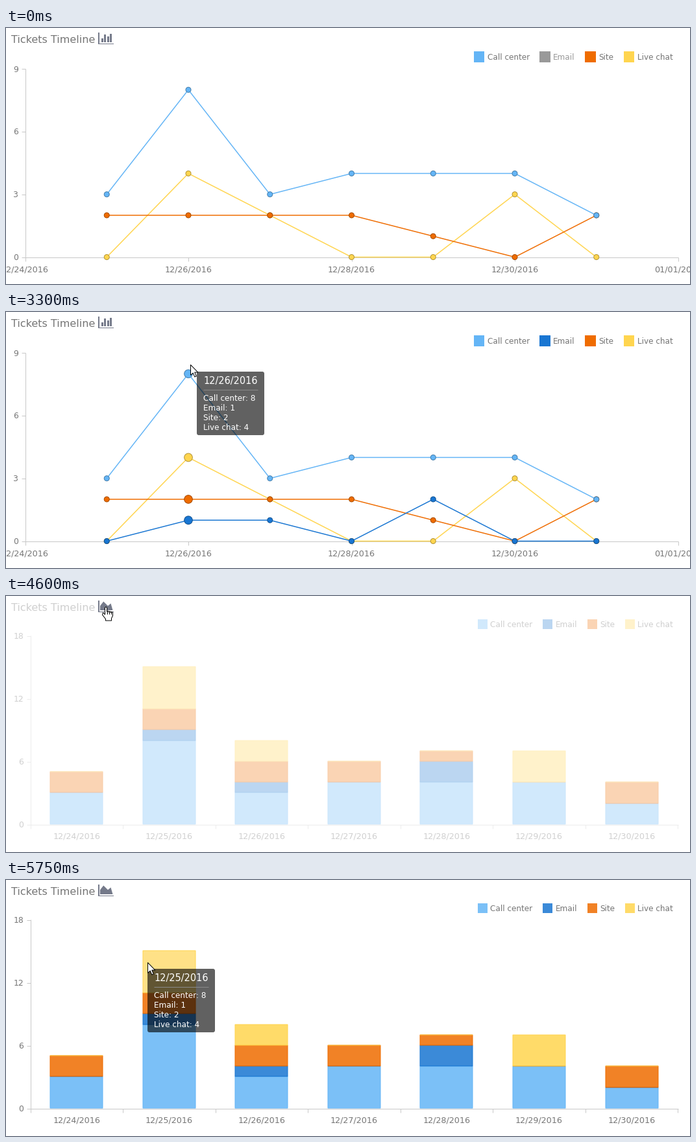
These frames come from a looping animation (1054 by 395 pixels, 6500 ms). A matplotlib script:

```python
import math

import matplotlib.pyplot as plt
from matplotlib.animation import FuncAnimation
from matplotlib.colors import to_rgb, to_rgba
from matplotlib.patches import Circle, FancyBboxPatch, Polygon, Rectangle

W, H, DPI = 1054, 395, 64
STEP, LOOP = 50, 6500
PT = 72 / DPI  # points per pixel

GRAY, AXIS, OFF = "#767676", "#c8c8c8", "#999999"
ICON, ICON_HOT = (0.46, 0.48, 0.54), (0.30, 0.72, 0.84)
EMAIL, EMAIL_SOFT = "#1976d2", "#6496e6"
FILL = 0.85  # opacity of bars and their legend

NAMES = ["Call center", "Email", "Site", "Live chat"]
COLORS = ["#64b5f6", EMAIL, "#ef6c00", "#ffd54f"]
DATA = [
    [3, 8, 3, 4, 4, 4, 2],
    [0, 1, 1, 0, 2, 0, 0],
    [2, 2, 2, 2, 1, 0, 2],
    [0, 4, 2, 0, 0, 3, 0],
]

plt.rcParams["font.family"] = "DejaVu Sans"
fig = plt.figure(figsize=(W / DPI, H / DPI), dpi=DPI, facecolor="white")
ax = fig.add_axes([0, 0, 1, 1])
ax.set_xlim(0, W)
ax.set_ylim(H, 0)
ax.axis("off")


def text(x, y, s, px=12, color=GRAY, ha="left", z=2):
    return ax.text(x, y, s, fontsize=px * PT, color=color, ha=ha,
                   va="baseline", zorder=z)


def line(xs, ys, color=AXIS, px=1.0, z=1):
    return ax.plot(xs, ys, color=color, lw=px * PT, zorder=z,
                   solid_capstyle="butt")[0]


def patch(p):
    return ax.add_patch(p)


def box(x, y, w, h, **kw):
    return patch(Rectangle((x, y), w, h, **kw))


def show(artists, on):
    for a in artists:
        a.set_visible(on)


def mix(a, b, k):
    return tuple(p + (q - p) * k for p, q in zip(a, b))


def darker(color):
    return mix(to_rgb(color), (0, 0, 0), 0.3)


def ramp(t, start, end):
    return min(1.0, max(0.0, (t - start) / (end - start)))


def smooth(k):
    return k * k * (3 - 2 * k)


def date(day):
    return f"12/{24 + day}/2016" if day < 8 else "01/01/2017"


def legend(x, size, base, alpha):
    squares, words = [], []
    for name, color in zip(NAMES, COLORS):
        squares.append(box(x, 36, size, size, fc=to_rgba(color, alpha),
                           ec="none", zorder=2))
        words.append(text(x + size + 4.5, base, name))
        x += size + 20 + words[-1].get_window_extent().width
    return squares, words


def axes_frame(x0, y0, top, ticks_x, ticks_y, labels_y, right):
    parts = [line([x0, x0], [top, y0]), line([x0, 1035.5], [y0, y0], z=6)]
    parts += [line([x, x], [y0, y0 + 6]) for x in ticks_x]
    for y, s in zip(ticks_y, labels_y):
        parts.append(line([x0 - 6, x0], [y, y]))
        parts.append(text(right, y + 4.5, s, 12.4, ha="right"))
    return parts


# Line chart
def line_x(day):
    return 29.5 + 125.75 * day


def line_y(v):
    return 353.5 - 32.27 * v


days, levels = range(0, 9, 2), range(0, 10, 3)
line_chart = axes_frame(29.5, 353.5, 63, map(line_x, days),
                        map(line_y, levels), levels, 19)
line_chart[1].set_zorder(1)
line_chart += [text(line_x(d), 376, date(d), 12.7, ha="center") for d in days]

xs = [line_x(d) for d in range(1, 8)]
series, peak_dots = {}, []
for i in reversed(range(4)):
    z = 5 - i * 0.5
    ys = [line_y(v) for v in DATA[i]]
    dots = [patch(Circle(p, 4, fc=COLORS[i], ec=darker(COLORS[i]), lw=PT,
                         zorder=z + 0.1)) for p in zip(xs, ys)]
    peak_dots.append(dots[1])
    series[i] = [line(xs, ys, COLORS[i], 1.5, z)] + dots
    line_chart += series[i]
email = series[1]

squares, words = legend(720.5, 16.5, 49, 1)
line_chart += squares + words
email_mark, email_word = squares[1], words[1]


# Stacked bar chart
def bar_x(k):
    return 37.5 + 142.54 * k


def bar_y(v):
    return round(352 - 16.17 * v)


levels = range(0, 19, 6)
bar_chart = axes_frame(37.5, 352.5, 61, map(bar_x, range(8)),
                       [bar_y(v) + 0.5 for v in levels], levels, 27.5)
bars = {}
for k in range(7):
    mid = bar_x(k + 0.5)
    bar_chart.append(text(mid, 375, date(k), 12.7, ha="center"))
    total = 0
    for i, color in enumerate(COLORS):
        low, total = bar_y(total), total + DATA[i][k]
        bars[k, i] = box(round(mid - 40.5), low, 81, bar_y(total) - low,
                         fc=to_rgba(color, FILL), ec=color, lw=PT,
                         snap=False, zorder=2 + i * 0.1)
bar_chart += bars.values()
hot_bar = bars[1, 3]
squares, words = legend(727, 15, 48, FILL)
bar_chart += squares + words

# Title, fade veil and switch icon
text(8, 23, "Tickets Timeline", 16)
veil = box(0, 0, W, H, fc="white", ec="none", zorder=8)

U = 1.5
frame_icon = [box(142, 7, U, 18, ec="none", zorder=9),
              box(142, 25 - U, 24, U, ec="none", zorder=9)]
bars_icon = [box(142 + 3 * U * (j + 1), 22 - h * U, 2 * U, h * U, ec="none",
                 zorder=9) for j, h in enumerate((4, 8, 6, 9))]
area_icon = [patch(Polygon([(142 + x * U, 7 + y * U) for x, y in
                            [(13, 3), (15, 10), (2, 10), (2, 5.5),
                             (5.5, 1), (10, 5.5)]], ec="none", zorder=9))]
icon = frame_icon + bars_icon + area_icon


def tooltip(x, y, title):
    parts = [patch(FancyBboxPatch((x, y), 104, 98, fc="black", ec="none",
                                  boxstyle="round,pad=0,rounding_size=3",
                                  zorder=10)),
             text(x + 10, y + 19, title, 14.5, "white", z=11),
             line([x + 10, x + 94], [y + 27.5, y + 27.5], "#8a8a8a", z=11)]
    for j, (name, row) in enumerate(zip(NAMES, DATA)):
        parts.append(text(x + 10, y + 45 + 15 * j, f"{name}: {row[1]}", 12,
                          "white", z=11))
    return parts


def fade_tip(tip, k):
    show(tip, k > 0)
    tip[0].set_alpha(0.62 * k)
    for a in tip[1:]:
        a.set_alpha(k)


line_tip = tooltip(294, 92, date(2))
bar_tip = tooltip(218, 137, date(1))

# Mouse pointers, drawn around their tip
ARROW = [(0, 0), (0, 16), (3.7, 12.6), (6.3, 18.6), (8.8, 17.5),
         (6.3, 11.6), (11.3, 11.6)]
FINGERS = [(3 * j - 1, 0.5 + 5.5 * (j > 0) + j * 0.7) for j in range(4)]
HAND = [(x + dx, y + (dx in (0, 3))) for x, y in FINGERS for dx in range(4)]
HAND += [(11, 14), (9, 18), (9, 21.5), (0, 21.5), (0, 19), (-5, 12.5),
         (-4, 9.2), (-1, 12)]
pointer = patch(Polygon(ARROW, fc="white", ec="black", lw=PT, zorder=12,
                        joinstyle="round"))
knuckles = [line([0, 0], [0, 0], "black", z=13) for _ in FINGERS[1:]]

# Pointer rests: arrival, departure, place
RESTS = [
    (500, 500, (915, 140)),
    (850, 1450, (829, 31)),
    (2600, 3300, (284, 81)),
    (3950, 5400, (153, 16)),
    (5750, LOOP, (218, 127)),
]


def pointer_at(t):
    pos = RESTS[0][2]
    for (_, leave, a), (arrive, _, b) in zip(RESTS, RESTS[1:]):
        if t > leave:
            pos = mix(a, b, smooth(ramp(t, leave, arrive)))
    return pos


def draw_pointer(t):
    x, y = pointer_at(t)
    on_icon = 142 <= x <= 167 and y <= 25
    x, y = math.floor(x) + 0.5, math.floor(y) + 0.5
    pointer.set_xy([(x + a, y + b) for a, b in (HAND if on_icon else ARROW)])
    pointer.set_visible(t >= 550)
    show(knuckles, on_icon)
    for k, (dx, dy) in zip(knuckles, FINGERS[1:]):
        k.set_data([x + dx, x + dx], [y + dy, y + 11.5])
    return on_icon


def update(n):
    t = n * STEP
    swapped = t >= 4500
    show(line_chart + bars_icon, not swapped)
    show(bar_chart + area_icon, swapped)

    if not swapped:
        clicked, lit = t >= 1000, t >= 1500
        show(email, clicked)
        color = EMAIL if lit else EMAIL_SOFT
        email[0].set_color(color)
        email_mark.set_facecolor(color if clicked else OFF)
        email_word.set_color(GRAY if lit else OFF)

    tip = ramp(t, 2350, 2550) * (1 - ramp(t, 3300, 3450))
    fade_tip(line_tip, tip)
    for dot in peak_dots:
        dot.set_radius(4 + 2.3 * tip)
    fade_tip(bar_tip, ramp(t, 5600, 5750))
    hot_bar.set_facecolor("#ffe187" if t >= 5650
                          else to_rgba(COLORS[3], FILL))

    if swapped:
        shown = math.sin(math.pi / 2 * ramp(t, 4500, 4950))
    else:
        shown = 1 - ramp(t, 4000, 4500)
    veil.set_alpha(1 - shown)

    hot = draw_pointer(t) * (ramp(t, 4800, 5200) if swapped else 1)
    for part in icon:
        part.set_facecolor(mix(ICON, ICON_HOT, hot))
    return []


anim = FuncAnimation(fig, update, frames=LOOP // STEP, interval=STEP,
                     init_func=lambda: update(0), repeat=True,
                     repeat_delay=0, blit=False)
plt.show()
```
